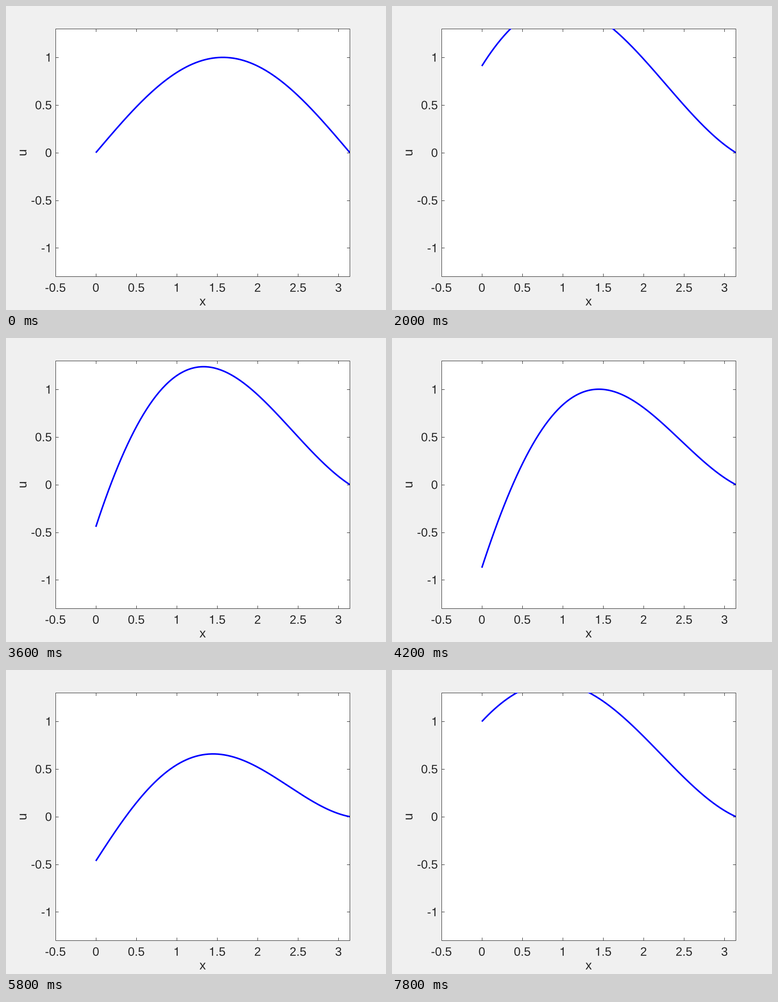
A matplotlib script that plays this animation: 837 px wide and 669 px high, repeating every 8 s.

```python
"""Heat equation u_t = u_xx + sin x + cos x on 0 < x < pi,
with u(0, t) = sin t, u(pi, t) = 0 and u(x, 0) = sin x."""
import numpy as np
import matplotlib.pyplot as plt
from matplotlib.animation import FuncAnimation
from matplotlib.patches import PathPatch, Rectangle
from matplotlib.path import Path
from matplotlib.textpath import TextPath
from matplotlib.transforms import Affine2D

W, H, DPI = 837, 669, 64
PT = 72 / DPI                       # points per pixel
FRAMES, INTERVAL = 40, 200
LEFT, RIGHT = 0.13 * W, 0.905 * W   # plot box as shares of the stage
TOP, BOTTOM = 0.075 * H, 0.89 * H
TICK = 0.01 * (RIGHT - LEFT)
TICK_SIZE, LABEL_SIZE = 26.67, 28
INK = "#262626"
FONT = {"family": "Liberation Sans"}
ADVANCE = {".": 0.278, "-": 0.333, "x": 0.5}

# The digit one without a foot, in em units
ONE = np.array([(0.359, 0), (0.359, 0.703), (0.301, 0.703), (0.272, 0.636),
                (0.215, 0.582), (0.101, 0.564), (0.101, 0.501),
                (0.271, 0.501), (0.271, 0), (0.359, 0)])


def px(x):
    return LEFT + (x + 0.5) * (RIGHT - LEFT) / (np.pi + 0.5)


def py(u):
    return TOP + (1.3 - u) * (BOTTOM - TOP) / 2.6


def crisp(v):
    """Centre of the pixel that a thin rule fills."""
    return round(v) + 0.5


fig = plt.figure(figsize=(W / DPI, H / DPI), dpi=DPI, facecolor="#f0f0f0")
ax = fig.add_axes([0, 0, 1, 1])
ax.set(xlim=(0, W), ylim=(H, 0))
ax.axis("off")


def label(text, x, y, size, align=0.5, angle=0):
    """Set text on its baseline; align is the share of it left of the anchor."""
    steps = [ADVANCE.get(c, 0.556) * size for c in text]
    pos = -align * sum(steps)
    for c, step in zip(text, steps):
        if c == "1":
            glyph = Path(ONE * size, closed=True)
        else:
            glyph = TextPath((0, 0), c, size=size, prop=FONT)
        place = (Affine2D().translate(pos, 0).rotate_deg(angle)
                 .scale(1, -1).translate(x, y))
        ax.add_patch(PathPatch(glyph.transformed(place), fc=INK, lw=0,
                               snap=False))
        pos += step


def rule(x, y):
    ax.plot(x, y, color=INK, lw=PT, solid_capstyle="butt", snap=False,
            zorder=2)


x0, x1, y0, y1 = map(crisp, (LEFT, RIGHT, TOP, BOTTOM))
ax.add_patch(Rectangle((x0, y0), x1 - x0, y1 - y0, fc="white", ec=INK, lw=PT,
                       snap=False, zorder=1))

for v in np.arange(-0.5, 3.1, 0.5):
    x = crisp(px(v))
    label(f"{v:g}", px(v), 628.8, TICK_SIZE)
    if v > -0.5:
        rule([x, x], [y0, y0 + TICK])
        rule([x, x], [y1, y1 - TICK])
for v in np.arange(-1, 1.1, 0.5):
    y = crisp(py(v))
    label(f"{v:g}", 101, py(v) + 0.35 * TICK_SIZE, TICK_SIZE, align=1)
    rule([x0, x0 + TICK], [y, y])
    rule([x1, x1 - TICK], [y, y])
label("x", (LEFT + RIGHT) / 2, 659, LABEL_SIZE)
label("u", 45, (TOP + BOTTOM) / 2, LABEL_SIZE, angle=90)

xs = np.linspace(0, np.pi, 161)
steady = np.sin(xs) + np.cos(xs) - 1 + 2 * xs / np.pi
m = np.sqrt(1j)
wave = np.sinh(m * (np.pi - xs)) / np.sinh(m * np.pi)

# Sine series of the part that dies out
n = np.arange(1, 61)
even = n[1::2]
coef = 2 * n / (np.pi * (n**4.0 + 1))
coef[1::2] -= 4 / (np.pi * even * (even**2 - 1.0))
modes = np.sin(np.outer(xs, n))


def solution(t):
    forced = (np.exp(1j * t) * wave).imag
    return steady + forced + modes @ (coef * np.exp(-n**2 * t))


curve, = ax.plot(px(xs), py(solution(0)), color="#0000ff", lw=3.4 * PT,
                 solid_capstyle="butt", solid_joinstyle="round", snap=False,
                 zorder=3)
curve.set_clip_path(Rectangle((LEFT, TOP), RIGHT - LEFT, BOTTOM - TOP,
                              transform=ax.transData))


def draw(i):
    curve.set_ydata(py(solution(i * INTERVAL / 1000)))
    return curve,


anim = FuncAnimation(fig, draw, frames=FRAMES, interval=INTERVAL,
                     repeat=True, repeat_delay=0)
plt.show()
```
